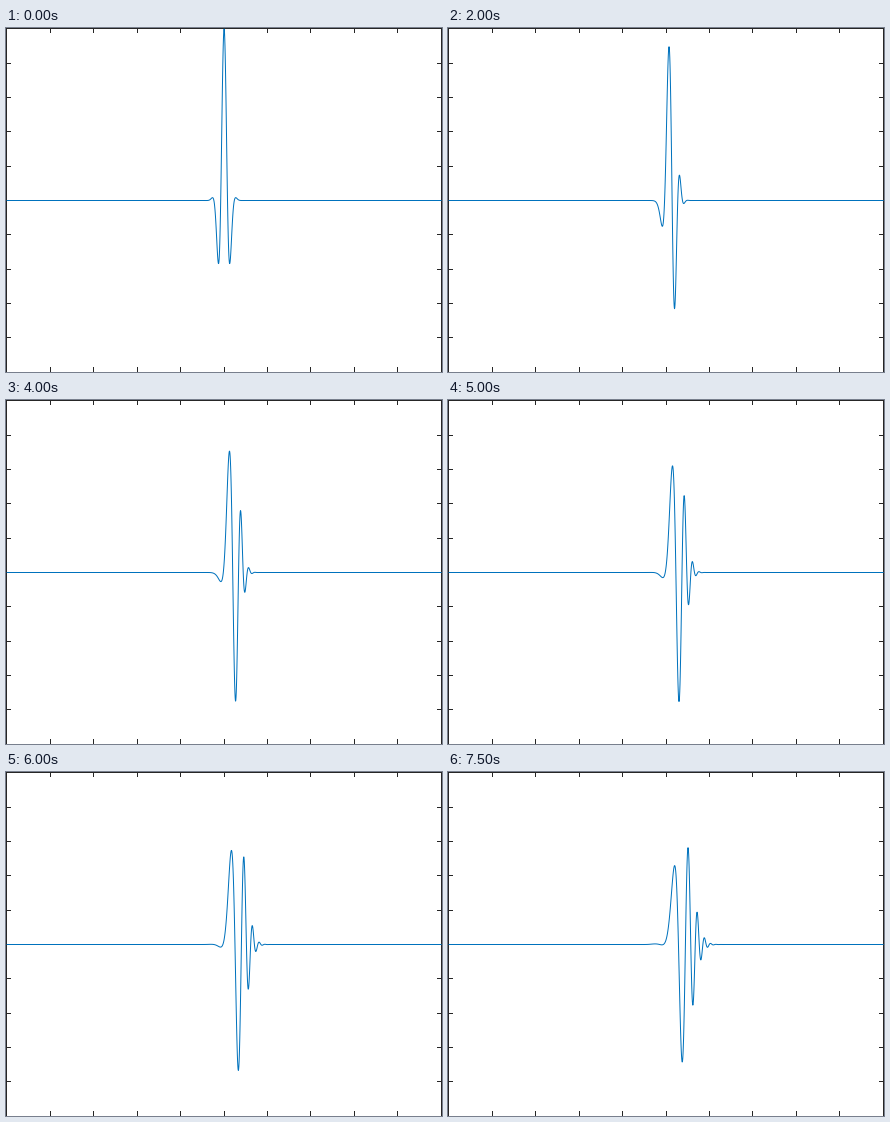
A matplotlib script that plays this animation: 436x344 px, repeating every 8 s.

```python
import numpy as np
import matplotlib.pyplot as plt
from matplotlib.animation import FuncAnimation

plt.rcParams["path.simplify"] = False
plt.rcParams["path.snap"] = False

W, H, DPI = 436, 344, 100
FRAMES, INTERVAL = 16, 500
PX = 72 / DPI                     # one pixel in points
INK = (0.15, 0.15, 0.15)
BLUE = (0, 114 / 255, 189 / 255)

# Plot box in pixels: centre, and pixels per unit for x in -5..5, y in -1..1
CX, CY = 218.1, 172.5
SX, SY = 43.4, 171.4

A, K = 50, 20                     # Gaussian sharpness and wave number
DT = 0.00125                      # time per step

fig = plt.figure(figsize=(W / DPI, H / DPI), dpi=DPI, facecolor="white")
ax = fig.add_axes([0, 0, 1, 1])
ax.set_xlim(0, W)
ax.set_ylim(H, 0)
ax.axis("off")


def segment(x0, y0, x1, y1):
    ax.plot([x0, x1], [y0, y1], color=INK, lw=PX, solid_capstyle="butt")


def draw_box(tick=5):
    """Left, right and top edges with inward ticks; the bottom edge is cropped."""
    for x in (0.5, W - 0.5):
        segment(x, 0, x, H)
    segment(0, 0.5, W, 0.5)
    for i in range(-4, 5):
        x = np.floor(CX + i * SX) + 0.5
        segment(x, 0, x, tick)
        segment(x, H - tick, x, H)
        y = np.floor(CY + i * SY / 5) + 0.5
        segment(0, y, tick, y)
        segment(W - tick, y, W, y)


def packet(x, t):
    """Real part of a free Gaussian wave packet."""
    spread = 1 + 2j * A * t
    psi = np.exp(1j * K * (x - K * t / 2) - A * (x - K * t) ** 2 / spread)
    return (psi / np.sqrt(spread)).real


x = np.linspace(-5, 5, 2001)
draw_box()
curve, = ax.plot(CX + SX * x, np.full_like(x, CY), color=BLUE, lw=PX, zorder=3)


def update(n):
    curve.set_ydata(CY - SY * packet(x, n * DT))
    return curve,


anim = FuncAnimation(fig, update, frames=FRAMES, interval=INTERVAL, repeat=True)
plt.show()
```
